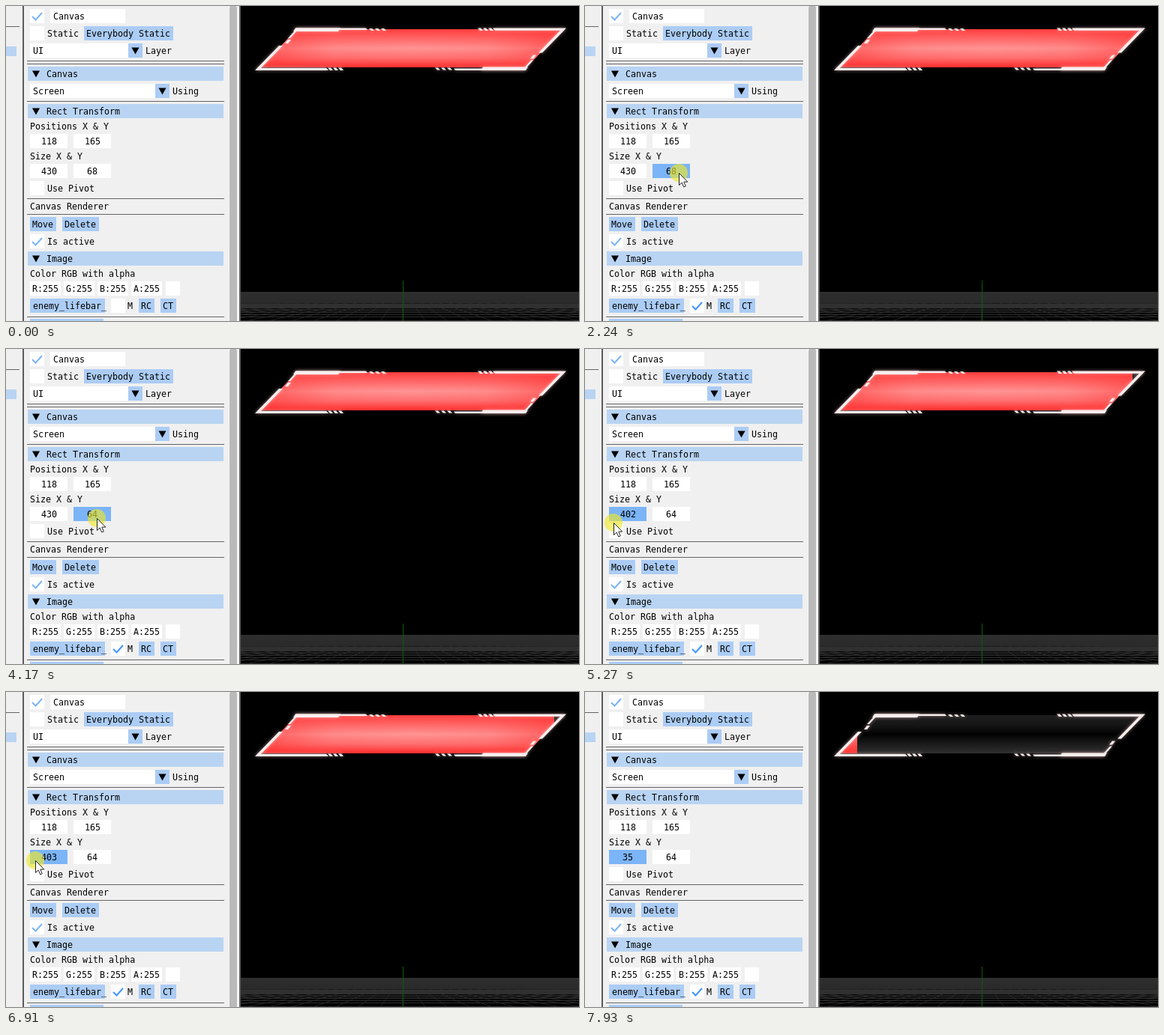
An HTML page with a canvas for the animation above (8000 ms loop, 764 by 421 pixels).

```html
<!DOCTYPE html>
<html lang="en">
<head>
<meta charset="utf-8">
<style>
  html, body { margin: 0; width: 100%; height: 100%; overflow: hidden; background: #000; }
  canvas { display: block; }
</style>
</head>
<body>
<canvas id="stage" width="764" height="421"></canvas>
<script>
const ctx = document.getElementById('stage').getContext('2d');
const LOOP = 8000;
const COLORS = {
  panel: '#f0f0f0', field: '#fff', hover: '#abccf4', active: '#7bb4f7',
  button: '#abccf4', header: '#b9d4f3', line: '#646464', border: '#5c5c5c',
  check: '#4296fa', paleCheck: '#7bb4f7'
};

const between = (v, lo, hi) => v >= lo && v < hi;
const mix = (a, b, u) => a + (b - a) * u;

// Eased progress from 0 to 1.
function ease(time, from, to) {
  const u = Math.min(1, Math.max(0, (time - from) / (to - from)));
  return u * u * (3 - 2 * u);
}

// A move between two points, bowed aside in the middle.
function travel(u, from, to, bowX, bowY) {
  const bow = Math.sin(Math.PI * u);
  return [mix(from[0], to[0], u) + bowX * bow, mix(from[1], to[1], u) + bowY * bow];
}

function sizeAt(t) {
  return {
    height: 68 - 39 * ease(t, 2480, 2940) + 35 * ease(t, 3320, 3950),
    width: 430 - 28 * ease(t, 4890, 5270) - 352 * ease(t, 5290, 5980) +
      353 * ease(t, 6100, 6910) + 6 * ease(t, 7030, 7230) - 374 * ease(t, 7230, 7930)
  };
}

// While a field is dragged, the pointer moves one pixel per unit.
function pointerAt(t, { width, height }) {
  const mask = [147, 402], fieldY = [125, 223], fieldX = [66, 226];
  if (t < 1400) return travel(ease(t, 70, 830), [226, 424], mask, -65, -50);
  if (t < 2240) return travel(ease(t, 1400, 2080), mask, fieldY, 0, -150);
  if (t < 4490) return [height + 57, 223 - 2 * ease(t, 2480, 2940) + 5 * ease(t, 3320, 3950)];
  if (t < 4810) return travel(ease(t, 4490, 4810), [121, 226], fieldX, 0, 17);
  return [width - 364, 226 + 6 * ease(t, 4890, 5270) - 7 * ease(t, 5290, 6910)];
}

function stateAt(time) {
  const size = sizeAt(time);
  const [x, y] = pointerAt(time, size);
  const dragY = between(time, 2240, 4490), dragX = time >= 4810;
  return {
    time, x, y, dragX, dragY,
    visible: time >= 70,
    pressed: dragX || dragY || between(time, 1080, 1160),
    width: Math.round(size.width),
    height: Math.round(size.height)
  };
}

function rect(x, y, w, h, color) {
  ctx.fillStyle = color;
  ctx.fillRect(x, y, w, h);
}

// A parallelogram whose lower edge is shifted by dx.
function slant(x, y, w, h, dx) {
  ctx.beginPath();
  ctx.moveTo(x, y);
  ctx.lineTo(x + w, y);
  ctx.lineTo(x + w + dx, y + h);
  ctx.lineTo(x + dx, y + h);
  ctx.fill();
}

function gradient(x0, y0, x1, y1, ...colors) {
  const fill = ctx.createLinearGradient(x0, y0, x1, y1);
  colors.forEach((c, i) => fill.addColorStop(i / (colors.length - 1), c));
  return fill;
}

// Widgets are placed by the middle line of their row.
function label(text, x, y) {
  ctx.font = '11.65px "DejaVu Sans Mono", monospace';
  ctx.fillStyle = '#000';
  ctx.fillText(text, x, y + 4);
}

function box(x, y, w, text = '', color = COLORS.field, pad = 4) {
  rect(x, y - 10, w, 19, color);
  label(text, x + pad, y);
}

const button = (x, y, w, text) => box(x, y, w, text, COLORS.button, 3);

function number(x, y, value, color) {
  const text = String(value);
  box(x, y, 50, text, color, Math.round(25 - text.length * 3.5));
}

function checkbox(x, y, mark, color = COLORS.field) {
  rect(x, y - 10, 19, 19, color);
  if (!mark) return;
  ctx.strokeStyle = mark;
  ctx.lineWidth = 2;
  ctx.beginPath();
  ctx.moveTo(x + 3, y);
  ctx.lineTo(x + 7.5, y + 4.5);
  ctx.lineTo(x + 16, y - 5);
  ctx.stroke();
}

function arrow(x, y) {
  ctx.fillStyle = '#000';
  ctx.beginPath();
  ctx.moveTo(x - 5, y - 4.5);
  ctx.lineTo(x + 5, y - 4.5);
  ctx.lineTo(x, y + 4.5);
  ctx.fill();
}

function combo(y, w, value, name) {
  box(32, y, w, value);
  rect(32 + w, y - 10, 19, 19, COLORS.button);
  arrow(41.5 + w, y);
  label(name, 55 + w, y);
}

function header(y, text) {
  rect(29, y - 10, 261, 19, COLORS.header);
  arrow(40, y);
  label(text, 54, y);
}

const separator = y => rect(28, y, 263, 1, COLORS.line);

function drawPanel({ x, y, time, dragX, dragY, visible, pressed, width, height }) {
  const tint = (left, mid, w, active) => {
    if (active) return COLORS.active;
    const hovered = between(x, left, left + w) && between(y, mid - 10, mid + 9);
    return visible && !pressed && hovered ? COLORS.hover : COLORS.field;
  };

  rect(0, 0, 313, 421, COLORS.panel);
  rect(0, 27, 18, 1, COLORS.line);
  rect(0, 54, 14, 13, COLORS.header);
  rect(22, 0, 2, 421, COLORS.border);
  rect(297, 0, 13, 421, '#f5f5f5');
  ctx.fillStyle = '#bababa';
  ctx.beginPath();
  ctx.roundRect(298, -2, 10, 440, 5);
  ctx.fill();
  rect(311, 0, 2, 421, COLORS.border);

  checkbox(32, 14, COLORS.paleCheck);
  box(59, 14, 100, 'Canvas');
  checkbox(32, 37);
  label('Static', 55, 37);
  button(104, 37, 119, 'Everybody Static');
  combo(60, 131, 'UI', 'Layer');
  separator(73);
  separator(77);
  header(91, 'Canvas');
  combo(114, 167, 'Screen', 'Using');
  separator(127);
  header(141, 'Rect Transform');
  label('Positions X & Y', 32, 161);
  number(32, 181, 118, tint(32, 181, 50));
  number(90, 181, 165, tint(90, 181, 50));
  label('Size X & Y', 32, 201);
  number(32, 221, width, tint(32, 221, 50, dragX));
  number(90, 221, height, tint(90, 221, 50, dragY));
  checkbox(32, 244, null, tint(32, 244, 19));
  label('Use Pivot', 55, 244);
  separator(257);
  label('Canvas Renderer', 32, 268);
  separator(278);
  button(32, 292, 35, 'Move');
  button(75, 292, 49, 'Delete');
  checkbox(32, 315, COLORS.paleCheck);
  label('Is active', 55, 315);
  header(338, 'Image');
  label('Color RGB with alpha', 32, 358);
  [...'RGBA'].forEach((c, i) => box(32 + 45 * i, 378, 41, c + ':255', COLORS.field, 3));
  box(213, 378, 19);
  box(32, 401, 100, 'enemy_lifebar_', COLORS.button);
  checkbox(140, 401, time >= 1080 && COLORS.check, tint(140, 401, 19));
  label('M', 162, 401);
  button(177, 401, 21, 'RC');
  button(206, 401, 21, 'CT');
  separator(415);
  rect(32, 418, 98, 3, COLORS.button);
}

function drawGrid() {
  rect(313, 0, 451, 421, '#000');
  rect(313, 382, 451, 15, gradient(0, 382, 0, 397, '#2e2e2e', '#2a2a2a'));
  rect(313, 397, 451, 8, gradient(0, 397, 0, 405, '#1c1c1c', '#000'));
  ctx.save();
  ctx.beginPath();
  ctx.rect(313, 397, 451, 24);
  ctx.clip();
  ctx.strokeStyle = '#303030';
  ctx.lineWidth = 0.7;
  ctx.beginPath();
  for (let i = -26; i <= 26; i++) {
    ctx.moveTo(529, 380);
    ctx.lineTo(529 + i * 30, 421);
  }
  ctx.stroke();
  for (let n = 8; n < 20; n++) rect(313, Math.round(382 + 300 / n), 451, 1, '#303030');
  ctx.restore();
  rect(529, 367, 1, 54, '#0b5c0b');
}

function drawInterior(...fills) {
  for (const fill of fills) {
    ctx.fillStyle = fill;
    slant(388, 31, 355, 51, -49);
  }
}

// One half of the frame; the other is the same turned by 180 degrees.
function drawHalfFrame() {
  slant(386, 29.5, 94, 2.5, 2);
  slant(386, 29.5, 60, 4.5, -3);
  slant(385, 33, 3, 10, -9);
  slant(376, 45, 4, 5, -4);
  slant(364, 53, 5, 33, -32);
  slant(335, 82.8, 92, 3.2, 3);
  for (let i = 0; i < 3; i++) {
    slant(484 + i * 8, 30, 4, 3, 3);
    slant(429 + i * 7, 82.5, 4, 3.5, 3);
  }
}

function drawLifebar(width, height) {
  drawInterior(gradient(0, 31, 0, 82, '#1e1e1e', '#161616', '#020202', '#1a1a1a', '#303030'));
  ctx.save();
  ctx.beginPath();
  ctx.rect(328, 23, width, height);
  ctx.clip();
  drawInterior(
    gradient(0, 31, 0, 82, '#ff3c3c', '#ff6868', '#ff9494', '#ff7070', '#ff2a2a'),
    gradient(338, 0, 742, 0, 'rgba(255,50,50,.6)', 'rgba(255,70,70,.1)',
      'rgba(255,70,70,0)', 'rgba(255,70,70,.1)', 'rgba(255,50,50,.6)')
  );
  ctx.restore();
  ctx.save();
  ctx.shadowColor = 'rgba(255,205,205,.6)';
  ctx.shadowBlur = 4;
  ctx.fillStyle = '#f8eeee';
  drawHalfFrame();
  ctx.translate(1079, 115.5);
  ctx.rotate(Math.PI);
  drawHalfFrame();
  ctx.restore();
}

function drawTooltip(x, y, text) {
  ctx.beginPath();
  ctx.roundRect(x + 23.5, y + 0.5, 224, 40, 6);
  ctx.fillStyle = '#fafafa';
  ctx.fill();
  ctx.strokeStyle = '#b4b4b4';
  ctx.lineWidth = 1;
  ctx.stroke();
  label(text, x + 30, y + 14);
}

function drawPointer({ x, y, pressed }) {
  if (pressed) {
    ctx.fillStyle = 'rgba(240,232,40,.64)';
    ctx.beginPath();
    ctx.arc(x, y, 12, 0, Math.PI * 2);
    ctx.fill();
  }
  ctx.save();
  ctx.translate(Math.round(x) + 0.5, Math.round(y) + 0.5);
  const shape = new Path2D('M0 0V16L3.7 12.6 6.2 18.4 8.8 17.3 6.3 11.6H11.3Z');
  ctx.fillStyle = '#fff';
  ctx.fill(shape);
  ctx.strokeStyle = '#222';
  ctx.lineWidth = 1;
  ctx.stroke(shape);
  ctx.restore();
}

function render(time) {
  const state = stateAt(time);
  const { x, y } = state;
  drawGrid();
  drawLifebar(state.width, state.height);
  drawPanel(state);
  if (!state.visible) return;
  const onMask = between(x, 140, 170) && between(y, 391, 410);
  const onTexture = between(x, 206, 230) && between(y, 405, 421);
  if (onMask || onTexture) drawTooltip(Math.round(x), Math.round(y), onMask ? 'Mask' : '');
  drawPointer(state);
}

function tick(now) {
  render(now % LOOP);
  requestAnimationFrame(tick);
}
requestAnimationFrame(tick);
</script>
</body>
</html>
```
